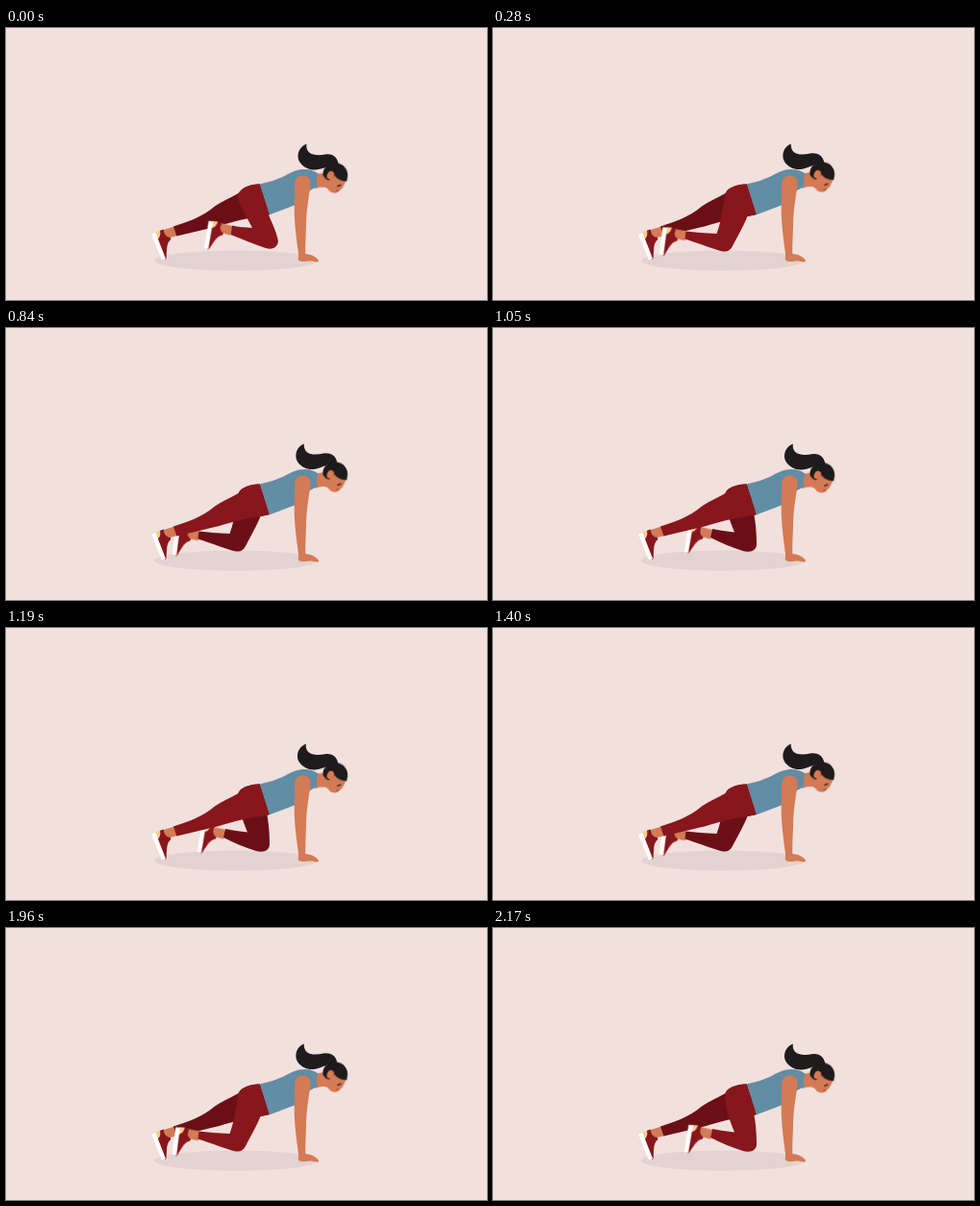
An HTML page without scripts that plays this animation: 500x283 px, repeating every 2240 ms.

```html
<!DOCTYPE html>
<html lang="en">
<head>
<meta charset="utf-8">
<title>Mountain climbers</title>
<style>
  html, body { margin: 0; width: 100%; height: 100%; overflow: hidden; background: #f2e0dd; }
  svg { display: block; width: 100%; height: 100%; }

  :root {
    --straight: path("M264 162.5C254 162.5 247 165 241.5 172C233 177 224 180.5 217 185.5C204 197 187 202 174 206.5L177.5 216.5C190 213.500 203 210.500 215 207.500C220 206.500 223 205.500 228 204C243 199.500 256 197 264.500 196L274 194Z");
    --lift: path("M264 162.5C254 162.5 246 166 241 171.5C233 179 227 190 219 202C208 205 197 208 185.5 209.5L186.4 219.5C197 221 209 222 220 222C227 222 230 221 234 217C244 209 255 202 264.5 196L274 194Z");
    --half: path("M264 162.5C254 162.5 245 165.5 242 171C239 183 238 200 232.5 214C220 213.5 210 212.5 200.5 211.5L199.5 219.5C210 222.5 223 228 235 231.5C241 233.5 246 233 249 227C254 217 261 205 264.5 196L274 194Z");
    --near: path("M264 162.5C254 162.5 242 165.5 241 174C241 186 246 200 251 212.5C243 211.5 235 210.5 228 209L226 218C237 223.5 248 228.5 260 232C267 234 274 232 274 225C274 214 273 203 271.5 195L274 194Z");
    --tuck: path("M264 162.5C254 162.5 242 166 241 176C243 186 250 196 256 208C249 207.5 241 207 235 205.5L233.5 215C245 219.5 258 225 270 229C276 231 282 229 283 222C281 211 276 202 273 194.5L274 194Z");
  }

  .pants { fill: #87171c; animation: bend 2240ms -3ms infinite; }
  .foot { transform-origin: 171px 212px; animation: step 2240ms -3ms infinite; }
  .far .pants { fill: #6b0f17; }
  .far .pants, .far .foot { animation-delay: -1123ms; }
  .head { transform-origin: 325px 160px; animation: nod 1120ms -3ms infinite; }
  .tail { animation: swing 1120ms -3ms infinite; }

  .skin { fill: #d47a54; }
  .hair { fill: #1d1b1c; }

  @keyframes bend {
    0% { d: var(--tuck); animation-timing-function: steps(1); }
    3.125% { d: var(--near); animation-timing-function: steps(3); }
    12.5% { d: var(--half); animation-timing-function: steps(2); }
    18.75% { d: var(--lift); animation-timing-function: steps(2); }
    25% { d: var(--straight); animation-timing-function: steps(1); }
    75% { d: var(--straight); animation-timing-function: steps(2); }
    81.25% { d: var(--lift); animation-timing-function: steps(2); }
    87.5% { d: var(--half); animation-timing-function: steps(3); }
    96.875% { d: var(--near); animation-timing-function: steps(1); }
    100% { d: var(--tuck); }
  }
  @keyframes step {
    0% { transform: translate(58px, -3.5px) rotate(31deg); animation-timing-function: steps(1); }
    3.125% { transform: translate(50.7px, .5px) rotate(31deg); animation-timing-function: steps(3); }
    12.5% { transform: translate(24px, 2.3px) rotate(28.6deg); animation-timing-function: steps(2); }
    18.75% { transform: translate(10px, 2px) rotate(17deg); animation-timing-function: steps(2); }
    25% { transform: translate(0, 0) rotate(0deg); animation-timing-function: steps(1); }
    75% { transform: translate(0, 0) rotate(0deg); animation-timing-function: steps(2); }
    81.25% { transform: translate(10px, 2px) rotate(17deg); animation-timing-function: steps(2); }
    87.5% { transform: translate(24px, 2.3px) rotate(28.6deg); animation-timing-function: steps(3); }
    96.875% { transform: translate(50.7px, .5px) rotate(31deg); animation-timing-function: steps(1); }
    100% { transform: translate(58px, -3.5px) rotate(31deg); }
  }
  @keyframes nod {
    0%, 100% { transform: translate(.4px, .5px) rotate(3.5deg); animation-timing-function: steps(8); }
    50% { transform: translate(.6px, -.6px) rotate(0deg); animation-timing-function: steps(8); }
  }
  @keyframes swing {
    0%, 100% {
      d: path("M312.5 120.5C304 124 301.5 133 305 139C309 145 315 148 322 147.500C332 146.500 334 142 345 144L345.500 141C344 133 338 130.500 332 131.500C320 133.500 311 131 312.5 120.5Z");
      animation-timing-function: steps(8);
    }
    50% {
      d: path("M306.8 120.5C299 124 297.5 133 301 139C305 145 312 147.500 318 146.500C327 145 331 139 341 142L343 139C341.500 131 335 128.500 328 129.500C318 132 308 133 306.8 120.5Z");
      animation-timing-function: steps(8);
    }
  }
</style>
</head>
<body>
<svg viewBox="0 0 500 283" preserveAspectRatio="none">
  <defs>
    <g id="shoe">
      <path class="skin" d="M164 210L175 206.5L178.500 216L167 219Z"/>
      <path fill="#f3cf8c" d="M154.500 213L160 210.500L161.500 217L157 221.500Z"/>
      <path fill="#87171c" d="M160 210.800L164 209.500C164.500 214 166.500 218 171 218L171.300 220C167 224 167.500 228 167 233C166.500 237 167.500 240 165.500 241L157 220.500C160 218 161 215 160 210.800Z"/>
      <path fill="#fff" d="M151.300 214.800L155.500 213L166 240L161.800 241.200Z"/>
    </g>
  </defs>
  <rect width="500" height="283" fill="#f2e0dd"/>
  <ellipse cx="239" cy="242" rx="85" ry="10.5" fill="#e2d3d0"/>

  <g class="far">
    <use class="foot" href="#shoe"/>
    <path class="pants"/>
  </g>
  <g>
    <use class="foot" href="#shoe"/>
    <path class="pants"/>
  </g>

  <g class="head">
    <path class="skin" d="M319 152L330 150L340 149L352.500 155C352.500 158 352 160 350.500 162.500C350 165 348 166 346 168.500C343 171 338 171 335.500 167.500C333 164 329 164 321 167Z"/>
    <path class="hair" d="M328.500 152C328 144 334 139 342 139C350 139 355 146 354.300 153L353.500 157.500C348 157 343.500 156 341 152L335 157.500C332 156.500 330 155 328.500 152Z"/>
    <ellipse class="skin" cx="336.500" cy="152" rx="3.500" ry="4.500" transform="rotate(25 336.500 152)"/>
    <path d="M344.500 162.800L347.500 161.500" stroke="#1d1b1c" stroke-width="1.300" stroke-linecap="round"/>
    <path d="M343 168L346 167" stroke="#9c3a2c" stroke-width=".8"/>
  </g>
  <path class="hair tail"/>

  <path fill="#618da5" d="M264 162.200C276 160 285 156.500 293 152C303 146.500 315 144.500 324.500 151.500C322.500 156 322.500 161 323.500 165L316 169L301 184L274 194.200Z"/>
  <path class="skin" d="M300 164C299.700 157 303.500 153.500 308.500 153.500C314.500 153.500 317.300 158 316.500 164C314.700 176 312.200 190 312 205C311.800 215 311 226 311.300 235C316 235.300 321 237 324 240.500C326 242.500 325 244 322 243.300L316 242.300C312 243.300 307 243.500 304.500 242C303 240.500 304.300 238 304 235C302.200 222 300.300 208 299.800 195C299.500 183 300 173 300 164Z"/>
</svg>
</body>
</html>
```
